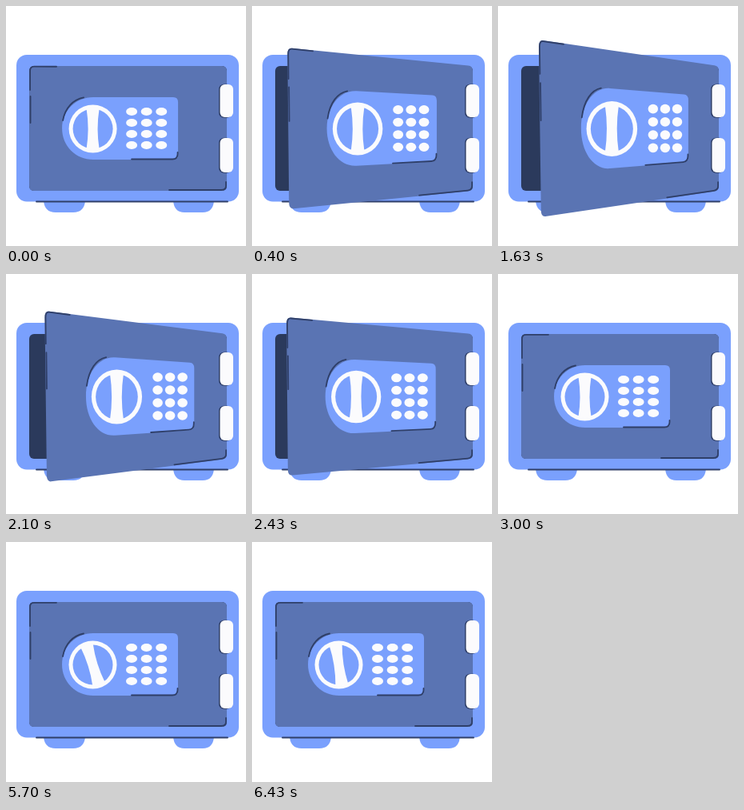
An HTML page for the animation above (6510 ms loop, 300 by 300 pixels).

```html
<!DOCTYPE html>
<html lang="en">
<head>
<meta charset="utf-8">
<title>Safe</title>
<style>
html, body { margin: 0; width: 100%; height: 100%; overflow: hidden; background: #fff; }
svg { display: block; width: 100%; height: 100%; }
.line { fill: none; stroke: #2f3f68; stroke-width: 1.8; stroke-linecap: round; stroke-linejoin: round; }
</style>
</head>
<body>
<svg id="stage" viewBox="0 0 300 300">
  <g fill="#7aa0fd">
    <path d="M47 243H99Q98 258 84 258H62Q48 258 47 243Z"/>
    <path d="M209 243H260Q259 258 246 258H223Q210 258 209 243Z"/>
    <rect x="13" y="61" width="278" height="183.5" rx="13"/>
  </g>
  <path class="line" d="M38 244.5H277"/>
  <rect x="29" y="75" width="247" height="156" rx="6" fill="#2b3a5c"/>
  <path id="door" fill="#5a74b3"/>
  <path id="doorLines" class="line"/>
  <path id="panel" fill="#7aa0fd"/>
  <path id="panelLines" class="line"/>
  <g id="dial">
    <circle r="30" fill="#fbfbfd"/>
    <circle r="25" fill="#7aa0fd"/>
    <path id="bar" fill="#fbfbfd" d="M-8 -25Q0 -28 8 -25Q4 0 8 25Q0 28 -8 25Q-4 0 -8 -25Z"/>
  </g>
  <g id="keys"></g>
  <g id="hinges"></g>
</svg>
<script>
const LOOP = 6510;
const $ = id => document.getElementById(id);

function add(parent, tag, attrs) {
  const el = document.createElementNS('http://www.w3.org/2000/svg', tag);
  set(el, attrs);
  parent.appendChild(el);
  return el;
}
function set(el, attrs) {
  for (const k in attrs) el.setAttribute(k, attrs[k]);
}

for (const [y, h] of [[98, 41], [165, 43]]) {
  add($('hinges'), 'rect', { x: 266, y: y - 0.3, width: 16, height: h + 1, rx: 6, fill: '#2f3f68' });
  add($('hinges'), 'rect', { x: 267.5, y, width: 16.5, height: h, rx: 6, fill: '#fbfbfd' });
}

const keys = [];
for (let row = 0; row < 4; row++)
  for (let col = 0; col < 3; col++)
    keys.push({ x: 157 + col * 18.6, y: 132 + row * 14, el: add($('keys'), 'ellipse', {}) });

// key index, pressed from, pressed until
const presses = [[3, 3700, 4030], [6, 4130, 4500], [8, 4600, 4930], [11, 5100, 5400]];

const shapes = {
  door: 'M29 81Q29 75 35 75L270 75Q276 75 276 81L276 225Q276 231 270 231L35 231Q29 231 29 225Z',
  doorLines: 'M30 105L30 81Q30 75.8 35 75.8L63 75.8M30.5 113L30.5 146M204 230L269 230Q275 230 275 225L275 220',
  panel: 'M109 114L209 114Q215 114 215 120L215 186Q215 192 209 192L109 192' +
    'C87 192 70 175 70 153C70 131 87 114 109 114Z',
  panelLines: 'M71 143C74 127 84 117 97 114.5M157 191.5L208 191.5Q214.5 191.5 214.5 185L214.5 183'
};

const clamp = v => Math.min(1, Math.max(0, v));
const smooth = s => s * s * (3 - 2 * s);

// bezier (x1, 0, x2, 1), solved by bisection
function ease(x, x1, x2) {
  let lo = 0, hi = 1;
  for (let i = 0; i < 24; i++) {
    const s = (lo + hi) / 2, r = 1 - s;
    if (3 * x1 * s * r * r + 3 * x2 * s * s * r + s * s * s < x) lo = s; else hi = s;
  }
  return smooth(lo);
}

function openness(t) {
  if (t < 1400) return 1 - Math.pow(1 - t / 1400, 3.5);
  return 1 - ease(clamp((t - 1500) / 1500), 0.78, 0.74);
}

function barAngle(t) {
  const turn = smooth(clamp((t - 5600) / 360));
  const back = smooth(clamp((t - 6100) / 410));
  return -90 * (turn - back);
}

const warp = (d, map) => d.replace(/([\d.]+) ([\d.]+)/g, (m, x, y) =>
  map(+x, +y).map(v => v.toFixed(2)).join(' '));

function draw(t) {
  const p = openness(t);

  const onDoor = (x, y) => {
    const k = p * (276 - x) / 247;
    return [x + k * (22 + 3 * (y - 75) / 156), y + k * (y - 153) * 0.423];
  };
  const onPanel = (x, y) => {
    const u = (x - 70) / 145;
    return [x + p * (34 - 11 * u), y + p * (y - 153) * (0.36 - 0.28 * u)];
  };
  for (const id in shapes)
    $(id).setAttribute('d', warp(shapes[id], id.startsWith('door') ? onDoor : onPanel));

  $('dial').setAttribute('transform',
    `translate(${108.5 + 34 * p} 153.5) scale(${1 + 0.06 * p} ${1 + 0.15 * p})`);
  $('bar').setAttribute('transform', `rotate(${barAngle(t)})`);

  keys.forEach(({ x, y, el }, i) => {
    const down = presses.some(([k, from, to]) => k === i && t >= from && t < to);
    set(el, {
      cx: x + p * (37 - 7 * (x - 157) / 37),
      cy: 153 + (y - 153) * (1 + 0.16 * p),
      rx: 7 - 0.8 * p,
      ry: 5 + 0.8 * p,
      fill: down ? '#a0bbff' : '#fbfbfd'
    });
  });
}

const start = performance.now();
function tick() {
  draw((performance.now() - start) % LOOP);
  requestAnimationFrame(tick);
}
tick();
</script>
</body>
</html>
```
